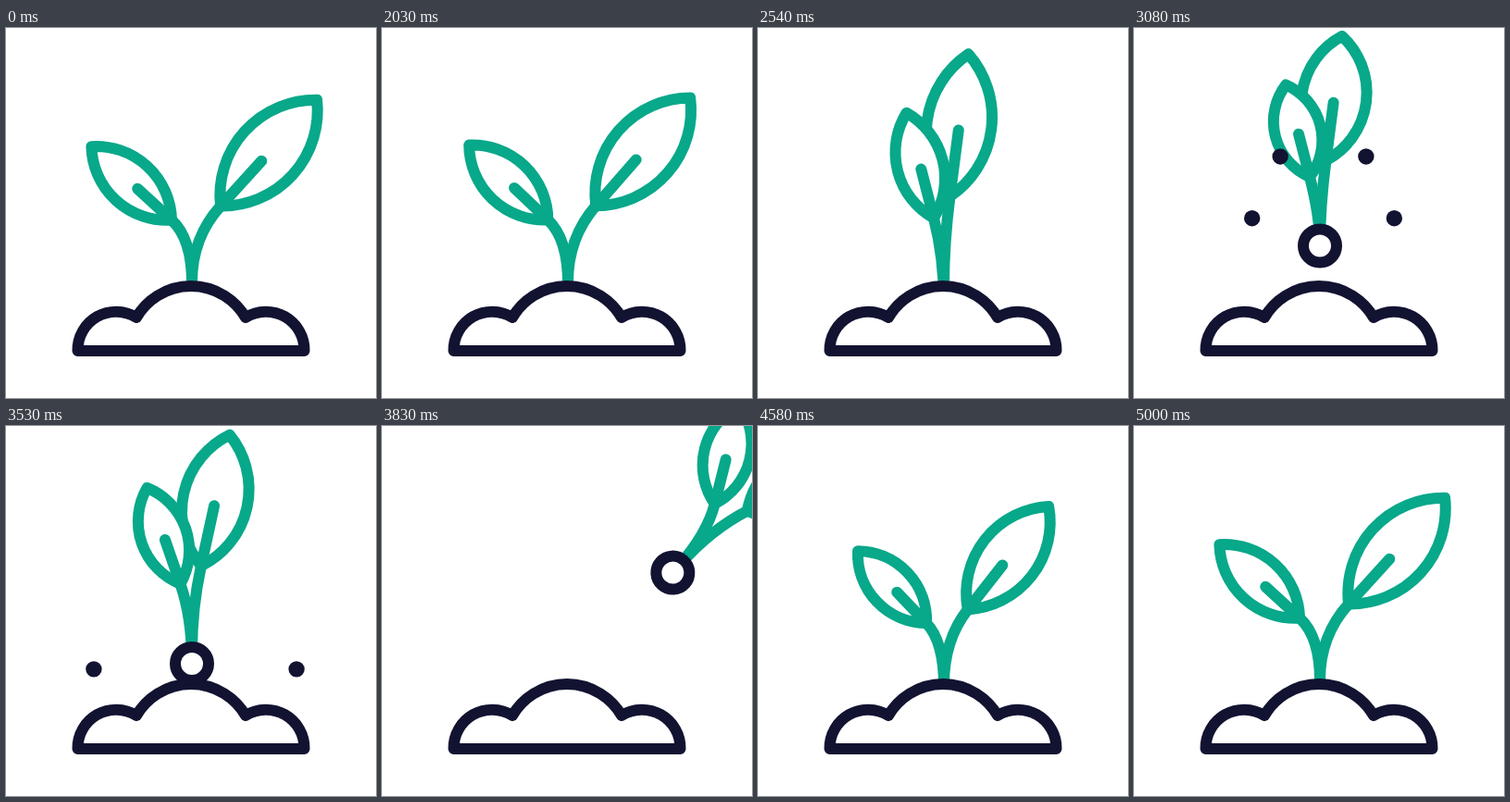
Write an HTML page that moves like this. It is 400 px wide and 400 px high and loops after 5030 ms.

```html
<!DOCTYPE html>
<html lang="en">
<head>
<meta charset="utf-8">
<title>Sprout</title>
<style>
  html, body { margin: 0; width: 100%; height: 100%; overflow: hidden; background: #fff; }
  svg { display: block; width: 100vw; height: 100vh; }
  path, .ball { fill: #fff; stroke-width: 12; stroke-linecap: round; stroke-linejoin: round; }
  .green { stroke: #08a88a; }
  .stem { fill: none; }
  .navy { stroke: #121331; }
  .dot { fill: #121331; }
</style>
</head>
<body>
<svg viewBox="0 0 400 400">
  <g id="plants"></g>
  <g id="dots"></g>
  <path class="navy" d="M77.500 349A41.500 41.500 0 0 1 141 313A68.200 68.200 0 0 1 259 313A41.500 41.500 0 0 1 322.500 349Z"/>
</svg>
<script>
const LOOP = 5030, START = 2030, STEP = 30;
const ROOT_X = 201, GROUND = 305, BURIED = 30;

// Each leaf swings between two placements, relative to the root
const LEAVES = [
  { len: 155, width: 35, closed: { x: 6.5, y: -123, deg: 7.4 }, open: { x: 31, y: -112.5, deg: 42.2 } },
  { len: 117.5, width: 25, closed: { x: -11, y: -99.5, deg: -14.5 }, open: { x: -22, y: -97.5, deg: -47.5 } }
];

const THROWS = [
  { start: 2750, out: 0.1405, up: 0.768, gravity: 0.00188 },
  { start: 2690, out: 0.197, up: 0.731, gravity: 0.00264 }
];

const span = (t, a, b) => Math.min(1, Math.max(0, (t - a) / (b - a)));
const smooth = p => p * p * (3 - 2 * p);
const lerp = (a, b, p) => a + (b - a) * p;

function add(parent, tag, attrs = {}) {
  const el = document.createElementNS("http://www.w3.org/2000/svg", tag);
  for (const k in attrs) el.setAttribute(k, attrs[k]);
  return parent.appendChild(el);
}

function show(el, on) {
  el.setAttribute("visibility", on ? "visible" : "hidden");
}

function makePlant() {
  const group = add(document.getElementById("plants"), "g");
  const leaves = LEAVES.map(shape => ({
    shape,
    blade: add(group, "path", { class: "green" }),
    stem: add(group, "path", { class: "green stem" })
  }));
  add(group, "circle", { class: "ball navy", r: 18 });
  return { group, leaves };
}

// spread: 0 closed, 1 open; size: growth above the soil; stretch: stem length
function drawLeaf({ shape, blade, stem }, { spread, size = 1, stretch = 1 }) {
  const mix = key => lerp(shape.closed[key], shape.open[key], spread);
  const x = mix("x") * size;
  const y = ((mix("y") + BURIED) * size - BURIED) * stretch;
  const a = mix("deg") * Math.PI / 180;
  const len = shape.len * size * (1 + stretch) / 2;
  const w = shape.width * size;
  const r = (len * len / 4 + w * w) / (2 * w);
  const along = k => `${x + Math.sin(a) * len * k} ${y - Math.cos(a) * len * k}`;
  const arc = `A${r} ${r} 0 0 1 `;
  blade.setAttribute("d", `M${along(0)}${arc}${along(1)}${arc}${along(0)}Z`);
  // The stem bends where the leaf axis meets the vertical
  const bend = y + x / Math.tan(a);
  const vein = 0.465 - 0.04 * spread;
  stem.setAttribute("d",
    `M0 0L0 ${Math.min(0, bend + 48)}Q0 ${bend} ${along(0)}L${along(vein)}`);
}

function drawPlant({ group, leaves }, pose, x, y, turn = 0) {
  group.setAttribute("transform", `translate(${x} ${y}) rotate(${turn})`);
  leaves.forEach(leaf => drawLeaf(leaf, pose));
}

// Fold up, jump out of the soil, sink back, bounce away
function drawLeaving(t) {
  const fold = t < START ? 0 : smooth(span(t, 1970, 2540));
  const sink = span(t, 3080, 3530);
  const push = span(t, 3530, 3620);
  const fly = span(t, 3620, 4000);
  const pose = {
    spread: 1 - fold + 0.14 * sink + 0.25 * push,
    stretch: 1 - 0.25 * smooth(span(t, 2540, 2950)) + 0.12 * sink
  };
  const y = GROUND - 78 * smooth(span(t, 2540, 2900)) + 30 * span(t, 2900, 3530)
    + 4 * push - 280 * fly * (1 - fly) - 60 * fly;
  show(oldPlant.group, fly < 1);
  drawPlant(oldPlant, pose, ROOT_X + 260 * fly ** 1.4, y, 75 * fly);
}

function drawGrowing(t) {
  const grow = 1 - (1 - span(t, 3830, 5000)) ** 2.4;
  show(newPlant.group, grow > 0);
  drawPlant(newPlant, { spread: grow ** 1.4, size: Math.max(0.02, grow) }, ROOT_X, GROUND);
}

const oldPlant = makePlant();
const newPlant = makePlant();
const dots = THROWS.flatMap(path => [-1, 1].map(side => ({
  path, side, el: add(document.getElementById("dots"), "circle", { class: "dot", r: 8.7 })
})));

function drawDot({ path: { start, out, up, gravity }, side, el }, t) {
  const d = t - start;
  const y = 290 - up * d + gravity * d * d / 2;
  show(el, d >= 0 && y < 316);
  el.setAttribute("cx", 204.5 + side * out * d);
  el.setAttribute("cy", y);
}

function render(t) {
  drawLeaving(t);
  drawGrowing(t);
  dots.forEach(dot => drawDot(dot, t));
}

const origin = performance.now();
function tick() {
  const t = (performance.now() - origin) % LOOP;
  render(t < START ? 0 : START + Math.floor((t - START) / STEP) * STEP);
  requestAnimationFrame(tick);
}
tick();
</script>
</body>
</html>
```
